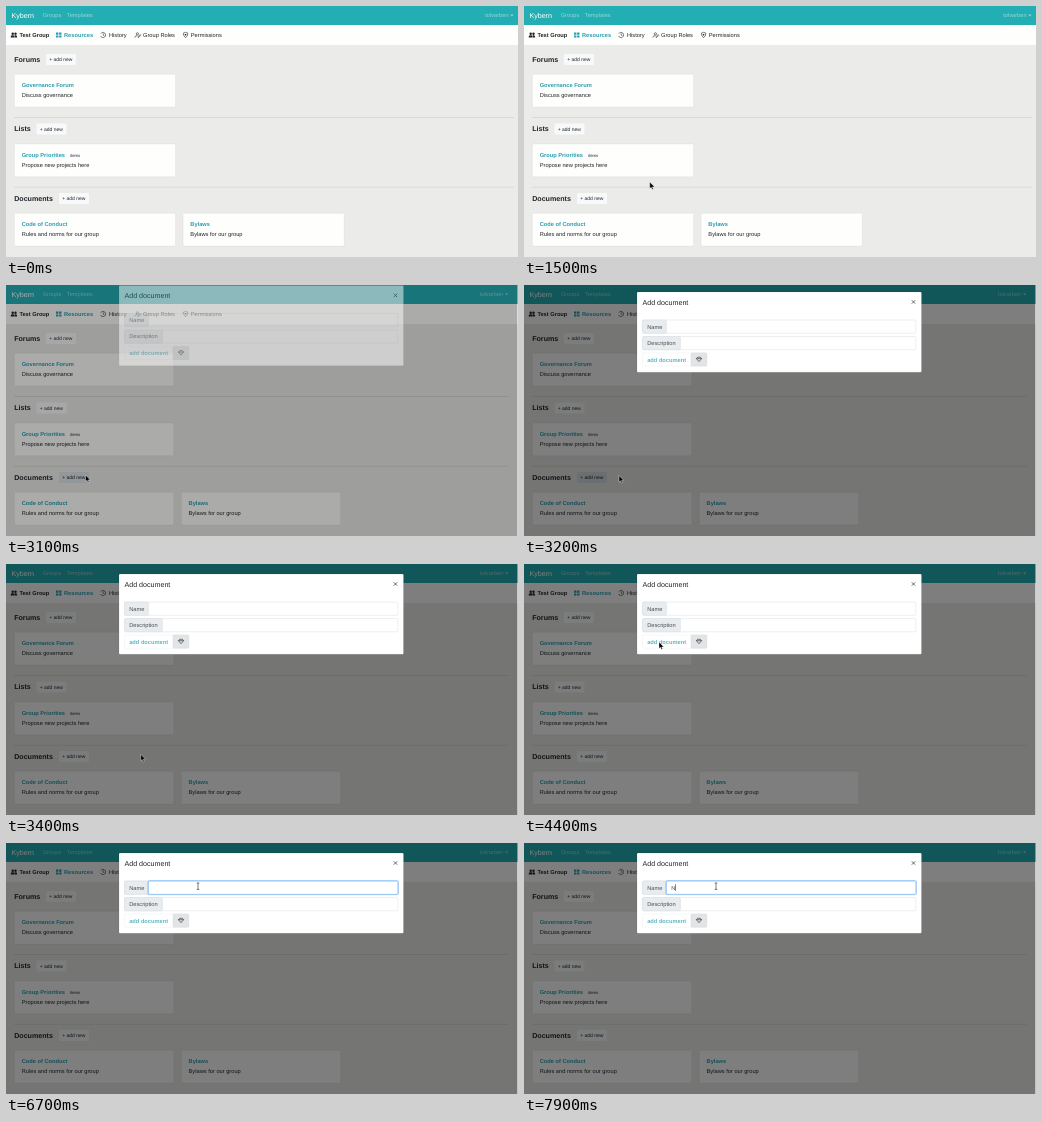
Write an HTML page that moves like this. It is 512 px wide and 251 px high and loops after 8000 ms.

```html
<!DOCTYPE html>
<html lang="en">
<head>
<meta charset="utf-8">
<title>Group resources</title>
<style>
  html, body { margin: 0; width: 100%; height: 100%; overflow: hidden; background: #ebebea; }
  svg { display: block; width: 100vw; height: 100vh; }
  text { font: 5.69px "Liberation Sans", Arial, sans-serif; fill: #212529; text-rendering: geometricPrecision; white-space: pre; }
  .bold { font-weight: bold; }
  .big { font-size: 7.11px; }
  .small { font-size: 4.98px; }
  .badge { font-size: 4.27px; }
  .teal { fill: #2a9fb0; }
  .white { fill: #fff; }
  .faded { fill: #fff; fill-opacity: .5; }
  .muted { fill: #495057; }
  .line { fill: none; stroke: #212529; stroke-width: .6; }
  .card { fill: #fefefd; stroke: #000; stroke-opacity: .125; stroke-width: .36; }
  .field { fill: #fff; stroke: #ced4da; stroke-width: .4; }
  .addon { fill: #e9ecef; stroke: #ced4da; stroke-width: .4; }
</style>
</head>
<body>
<svg viewBox="0 0 512 251" preserveAspectRatio="none">
  <g id="page"></g>
  <rect id="backdrop" width="511.4" height="251"/>
  <g id="modal">
    <rect x="113" y="10" width="284.5" height="80.3" rx="1" fill="#fff" stroke="#000" stroke-opacity=".2" stroke-width=".36"/>
    <text class="big" x="118.5" y="23">Add document</text>
    <path d="M387.8 18.3l3.4 3.4m0-3.4l-3.4 3.4" class="line" style="stroke-width:.9;stroke:#555"/>
    <rect class="field" x="118.6" y="38.1" width="273.3" height="13.2" rx="1.2"/>
    <rect class="addon" x="118.6" y="38.1" width="23.8" height="13.2" rx="1.2"/>
    <text class="muted" x="123.2" y="46.7">Name</text>
    <g id="focus">
      <rect x="141.9" y="37.6" width="250.5" height="14.2" rx="1.6" fill="none" stroke="#007bff" stroke-opacity=".25" stroke-width="1.1"/>
      <rect x="142.4" y="38.1" width="249.5" height="13.2" rx="1" fill="#fff" stroke="#66aef5" stroke-width=".6"/>
    </g>
    <text id="typed" class="muted" x="147.2" y="46.6"></text>
    <rect id="caret" y="41.2" width=".6" height="6.6" fill="#333"/>
    <rect class="field" x="118.6" y="54.6" width="273.3" height="13.2" rx="1.2"/>
    <rect class="addon" x="118.6" y="54.6" width="37.8" height="13.2" rx="1.2"/>
    <text class="muted" x="123.2" y="63.1">Description</text>
    <rect class="field" x="118.6" y="71" width="64" height="13.2" rx="1.2" stroke-opacity=".5"/>
    <rect class="addon" x="167" y="71" width="15.8" height="13.2" rx="1.2" style="fill:#e2e4e6"/>
    <text class="bold teal" x="123.2" y="79.6" opacity=".75">add document</text>
    <path class="line" d="M173.6 75.3h2.8l1.2 1.4-2.6 3-2.6-3zM172.4 76.7h5.2"/>
  </g>
  <path id="arrow" d="M0 0V6.6L1.5 5.3 2.5 7.6 3.6 7.1 2.6 4.9H4.8Z" fill="#000" stroke="#fff" stroke-width=".4"/>
  <path id="beam" class="line" d="M-1.3 0H1.3M0 0V6.4M-1.3 6.4H1.3"/>
</svg>
<script>
const LOOP = 8000, STEP = 100;
const $ = id => document.getElementById(id);

const text = (x, y, str, cls = "", extra = "") => `<text x="${x}" y="${y}" class="${cls}" ${extra}>${str}</text>`;
const rect = (x, y, w, h, attrs) => `<rect x="${x}" y="${y}" width="${w}" height="${h}" ${attrs}/>`;

function card(x, y, w, title, note) {
  return rect(x, y, w, 32.8, 'class="card" rx="1"') +
    text(x + 7.3, y + 12.8, title, "bold teal") + text(x + 7.3, y + 22.7, note);
}

function section(y, title, buttonX, id) {
  return text(8.2, y + 7.5, title, "bold big") +
    rect(buttonX, y, 30, 11, `id="${id}" rx="1" fill="#f8f9fa"`) +
    text(buttonX + 3.2, y + 7.2, "+ add new", "small");
}

const icons = `
  <g fill="#212529"><circle cx="6.7" cy="27.8" r="1.2"/><circle cx="9.5" cy="27.8" r="1.2"/>
    <path d="M4.7 31.5v-.8q0-1.4 2-1.4t2 1.4v.8zM9 31.5v-1.2l-.4-1q2.5-.3 2.5 1.4v.8z"/></g>
  <path class="teal" d="M50 26.6h2.4v2.1H50zm3.1 0h2.4v2.1h-2.4zM50 29.4h2.4v2.1H50zm3.1 0h2.4v2.1h-2.4z"/>
  <path class="line" d="M94.8 27.6a2.6 2.6 0 1 1-.2 2.4M97.2 27.4v1.8l1.2.7"/>
  <path class="line" d="M130.3 27.8a1.1 1.1 0 1 1 2.2 0 1.1 1.1 0 1 1-2.2 0M128.8 31.5q0-1.9 2.6-1.9M132 31.4l.3-1 1.8-1.8.7.7-1.8 1.8z"/>
  <path class="line" d="M179.6 26.3l2.2.8q.1 3.2-2.2 4.6-2.3-1.4-2.2-4.6z"/><circle cx="179.6" cy="28.7" r=".8"/>`;

// Opening the dialog pads the page by the width of a scrollbar.
function drawPage(padding) {
  const width = 512 - padding, pitch = (width - 6) / 3, cardWidth = pitch - 7.5;
  const rule = y => rect(8, y, width - 12, .8, 'fill="#d6d6d5"');
  $("page").innerHTML =
    rect(0, 0, 512, 251, 'fill="#ebebea"') + rect(0, 19, 512, 20, 'fill="#fefefd"') + rect(0, 0, 512, 19, 'fill="#23aeb4"') +
    text(5.4, 11.9, "Kybern", "big white") + text(36.7, 11.4, "Groups", "faded") + text(60.8, 11.4, "Templates", "faded") +
    text(width - 9.4, 11.4, "tolvarben", "faded", 'text-anchor="end"') +
    `<path class="faded" d="M${width - 7.8} 8.6h3.4l-1.7 1.8z"/>` + icons +
    text(13.4, 31.2, "Test Group", "bold") + text(58, 31.2, "Resources", "bold teal") +
    text(103, 31.2, "History") + text(137, 31.2, "Group Roles") + text(184.8, 31.2, "Permissions", "", 'id="permissions"') +
    section(48, "Forums", 40, "addForum") + card(8.4, 68.2, cardWidth, "Governance Forum", "Discuss governance") + rule(111) +
    section(117.5, "Lists", 30.5, "addList") + card(8.4, 138, cardWidth, "Group Priorities", "Propose new projects here") +
    text(64, 150.9, "items", "badge") + rule(180.8) +
    section(187, "Documents", 53, "addDocument") +
    card(8.4, 207.2, cardWidth, "Code of Conduct", "Rules and norms for our group") +
    card(8.4 + pitch, 207.2, cardWidth, "Bylaws", "Bylaws for our group") +
    (padding ? rect(511.2, 0, .8, 251, 'fill="#fff" opacity=".5"') : "");
}

// Pointer stops: time, x, y
const stops = [
  [500, 205, 21], [600, 205, 21], [700, 222, 60], [800, 200, 130], [900, 173, 162],
  [1100, 173, 162], [1900, 78.5, 190], [3000, 78.5, 190], [3100, 79.5, 190], [3200, 95, 190.5], [3400, 134.7, 190.3],
  [3600, 134.7, 190.3], [4400, 135, 78], [4600, 135, 78], [4700, 135.3, 78],
  [5100, 135.3, 78], [5400, 144, 78.3], [5600, 144, 78.3], [5700, 162, 78], [5800, 185, 70],
  [6000, 185, 70], [6100, 190.5, 47], [6200, 192, 40]
];

function pointerAt(t) {
  const next = stops.findIndex(s => s[0] > t);
  if (next < 0) return stops[stops.length - 1].slice(1);
  if (next === 0) return [-20, -20];
  const [t0, x0, y0] = stops[next - 1], [t1, x1, y1] = stops[next];
  const u = (t - t0) / (t1 - t0), e = u * u * (3 - 2 * u);
  return [x0 + (x1 - x0) * e, y0 + (y1 - y0) * e];
}

const clamp = v => Math.min(1, Math.max(0, v));
let drawnPadding;

function render(t) {
  const padding = t >= 3000 ? 5.33 : 0;
  if (padding !== drawnPadding) drawPage(drawnPadding = padding);

  $("permissions").style.fill = t >= 500 && t < 700 ? "#4a5056" : "";
  $("addDocument").style.fill = t >= 1900 && t < 2800 ? "#e0e4e7" : t >= 2800 && t < 3300 ? "#dae0e5" : "";

  const shown = clamp((t - 3000) / 200);
  $("backdrop").style.opacity = t < 3100 ? 0 : t < 3200 ? .33 : .5;
  $("modal").style.opacity = shown;
  const rise = 9.6 * Math.pow(1 - clamp((t - 3100) / 300), 2.8);
  $("modal").setAttribute("transform", `translate(0 ${-rise})`);

  $("focus").style.opacity = t < 6500 ? 0 : clamp((t - 6450) / 200);
  const typed = t >= 7900;
  $("typed").textContent = typed ? "N" : "";
  $("caret").setAttribute("x", typed ? 151.4 : 147.2);
  $("caret").style.opacity = t >= 7700 ? 1 : 0;

  const [x, y] = pointerAt(t), overField = t >= 6100;
  $("arrow").style.opacity = overField ? 0 : 1;
  $("beam").style.opacity = overField ? 1 : 0;
  for (const id of ["arrow", "beam"]) $(id).setAttribute("transform", `translate(${x} ${y})`);
}

const start = performance.now();
function tick() {
  const t = (performance.now() - start) % LOOP;
  render(Math.floor(t / STEP) * STEP);
  requestAnimationFrame(tick);
}
tick();
</script>
</body>
</html>
```
